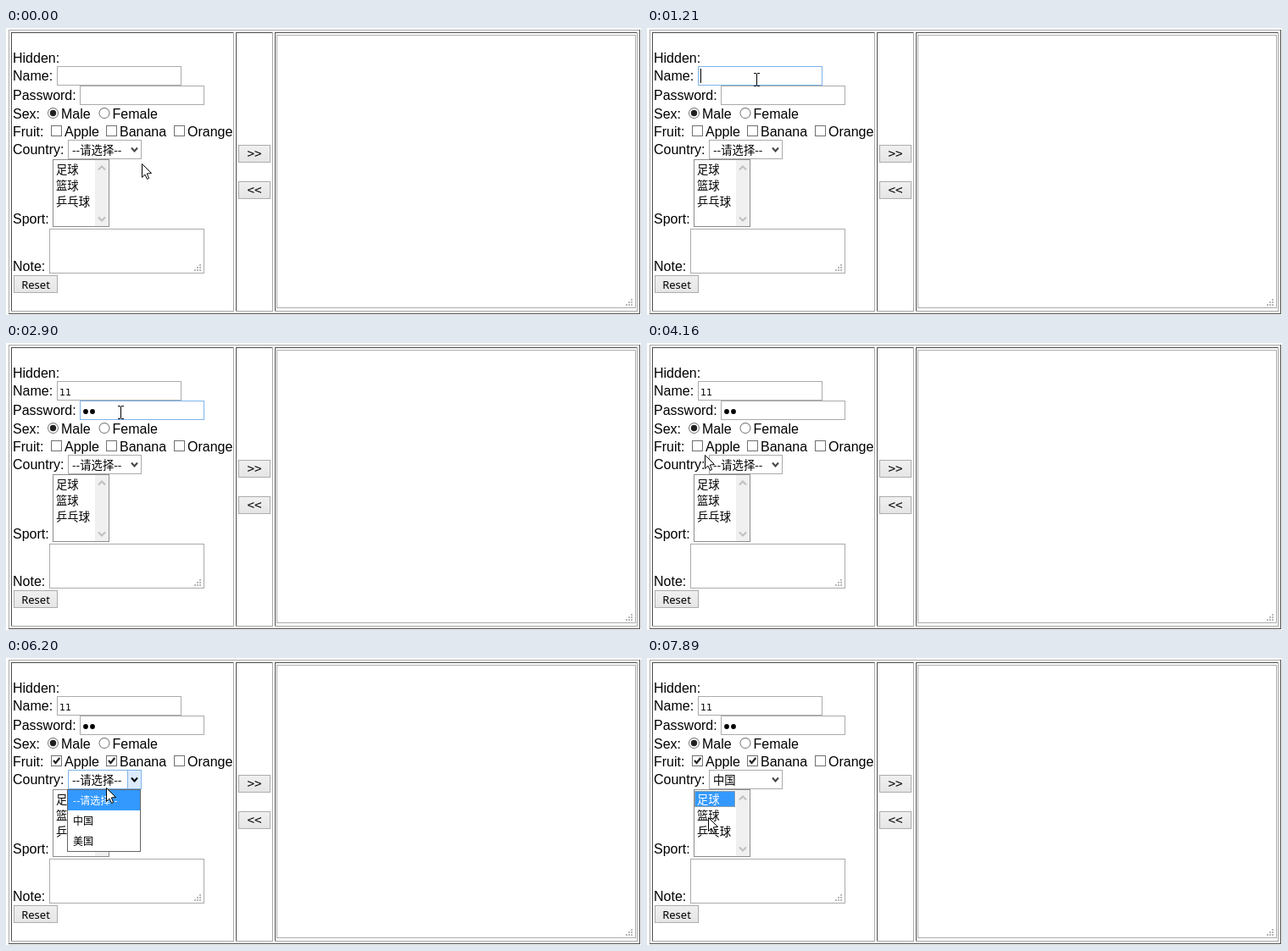
Recreate the animation shown at these times as an HTML page with a canvas. Size 749 by 339 pixels, loop 8 s.

```html
<!DOCTYPE html>
<html lang="en">
<head>
<meta charset="utf-8">
<title>Form demo</title>
<style>
  html, body { margin: 0; width: 100%; height: 100%; overflow: hidden; background: #fff; }
  canvas { display: block; }
</style>
</head>
<body>
<canvas id="stage" width="749" height="339"></canvas>
<script>
const ctx = document.getElementById('stage').getContext('2d', { alpha: false });
const LOOP = 8000, TICK = 126.5, TICK_OFFSET = 60;
const LABEL = '16px "Liberation Sans", Arial, sans-serif';
const BUTTON = '13px "Noto Sans", sans-serif';
const TYPED = '11px "DejaVu Sans", sans-serif';
const cjk = size => `${size}px "Noto Sans CJK SC", "Noto Sans CJK JP", "Noto Sans CJK", sans-serif`;
const GRAY = '#ababab', BLUE = '#7eb4ea', SELECT = '#3399ff', INK = '#212121';
const DARK_EDGE = '#4d4d4d', LIGHT_EDGE = '#a8a8a8';
const COUNTRIES = ['--请选择--', '中国', '美国'];
const SPORTS = ['足球', '篮球', '乒乓球'];

const NAME = { x: 60, y: 45, focus: 7, click: 10, keys: [14, 16], blur: 17 };
const PASSWORD = { x: 87, y: 68, focus: 17, click: 17, keys: [20, 23], blur: 31 };
const APPLE_CLICK = 37, BANANA_CLICK = 44, LIST_OPEN = 48, COUNTRY_CLICK = 56, SPORT_CLICK = 59;

// Places where the pointer turns or rests.
const visits = [
  { arrive: 0, x: 160, y: 160 },
  { arrive: 3, x: 270, y: 104 },
  { arrive: 8, leave: 21, x: 129, y: 61 },
  { arrive: 23, leave: 29, x: 135, y: 82 },
  { arrive: 33, x: 68, y: 132 },
  { arrive: 36, leave: APPLE_CLICK, x: 60, y: 122 },
  { arrive: 40, x: 155, y: 132 },
  { arrive: 41, x: 143, y: 126 },
  { arrive: 43, leave: BANANA_CLICK, x: 127, y: 127 },
  { arrive: 49, x: 118, y: 153 },
  { arrive: 55, leave: COUNTRY_CLICK, x: 110, y: 190 },
  { arrive: SPORT_CLICK, leave: 60, x: 72, y: 173 },
  { arrive: 62, x: 72, y: 188 }
];

function pointerAt(tick) {
  const i = visits.findLastIndex(visit => visit.arrive <= tick);
  const from = visits[i], to = visits[i + 1] || from;
  const start = from.leave ?? from.arrive;
  const part = tick > start && to !== from ? (tick - start) / (to.arrive - start) : 0;
  const mix = axis => Math.round(from[axis] + (to[axis] - from[axis]) * part);
  return { x: mix('x'), y: mix('y'), shown: tick < 12 || tick > 21 };
}

function rect(x, y, w, h, color) {
  ctx.fillStyle = color;
  ctx.fillRect(x, y, w, h);
}

function box(x, y, w, h, border, fill = '#fff') {
  rect(x, y, w, h, border);
  rect(x + 1, y + 1, w - 2, h - 2, fill);
}

function bevel(x, y, w, h, topLeft, bottomRight) {
  box(x, y, w, h, bottomRight);
  rect(x, y, w - 1, 1, topLeft);
  rect(x, y, 1, h - 1, topLeft);
}

function cell(left, right) {
  bevel(left, 5, right - left, 330, DARK_EDGE, LIGHT_EDGE);
}

function text(string, x, y, font = LABEL, color = '#000', align = 'left') {
  ctx.font = font;
  ctx.fillStyle = color;
  ctx.textAlign = align;
  ctx.fillText(string, x, y);
}

function line(points, color, width) {
  ctx.beginPath();
  points.forEach(([x, y]) => ctx.lineTo(x, y));
  ctx.strokeStyle = color;
  ctx.lineWidth = width;
  ctx.stroke();
}

function chevron(x, y, half, depth, color) {
  line([[x - half, y], [x, y + depth], [x + half, y]], color, 2);
}

function disc(x, y, r, color) {
  ctx.beginPath();
  ctx.arc(x, y, r, 0, Math.PI * 2);
  ctx.fillStyle = color;
  ctx.fill();
}

function button(x, y, w, label, font) {
  const shade = ctx.createLinearGradient(0, y, 0, y + 21);
  shade.addColorStop(0, '#f0f0f0');
  shade.addColorStop(1, '#e5e5e5');
  box(x, y, w, 21, '#acacac', shade);
  text(label, x + w / 2, y + 16, font, '#000', 'center');
}

function textarea(x, y, w, h) {
  box(x, y, w, h, GRAY);
  for (let row = 0; row < 3; row++)
    for (let col = 0; col <= row; col++)
      rect(x + w - 6 - col * 3, y + h - 11 + row * 3, 2, 2, '#b8b8b8');
}

function radio(x, label, on) {
  disc(x, 100.5, 6.5, '#707070');
  disc(x, 100.5, 5.5, '#fff');
  if (on) disc(x, 100.5, 3.7, INK);
  text(label, x + 9.5, 107);
}

function checkbox(x, label, on, hot) {
  box(x, 115, 13, 13, hot ? SELECT : '#707070', hot ? '#f3f9ff' : '#fff');
  if (on) line([[x + 3, 121], [x + 5.5, 124], [x + 10.3, 118]], INK, 2.2);
  text(label, x + 16, 128);
}

function field({ x, y, focus, click, keys, blur }, tick, hot, masked) {
  const focused = tick >= focus && tick < blur;
  const count = keys.filter(key => key <= tick).length;
  box(x, y, 147, 23, focused || hot ? BLUE : GRAY);
  for (let i = 0; i < count; i++) {
    if (masked) disc(x + 7 + i * 8, y + 13, 2.9, '#000');
    else text('1', x + 3 + i * 7, y + 17, TYPED);
  }
  const blinkOn = (tick - NAME.click) % 8.5 < 4;
  if (focused && tick >= click && blinkOn)
    rect(x + 3 + count * (masked ? 8 : 7), y + 3, 1, 17, '#000');
}

function ibeam(x, y) {
  rect(x, y - 7, 1, 14, '#000');
  for (const row of [y - 8, y + 7]) {
    rect(x - 3, row, 3, 1, '#000');
    rect(x + 1, row, 3, 1, '#000');
  }
}

function arrow(x, y) {
  ctx.save();
  ctx.translate(x, y);
  const shape = new Path2D('M.5 .5V16.5L4 13.2 6.5 18.5 8.6 17.5 6.3 12 11.5 11.5Z');
  ctx.fillStyle = '#fff';
  ctx.fill(shape);
  ctx.strokeStyle = '#000';
  ctx.lineWidth = 1;
  ctx.stroke(shape);
  ctx.restore();
}

function drawTable() {
  rect(0, 0, 749, 339, '#fff');
  bevel(3, 2, 745, 336, LIGHT_EDGE, DARK_EDGE);
  cell(6, 269);
  cell(271, 315);
  cell(317, 745);
  textarea(319, 8, 424, 323);
  button(274, 138, 38, '>>', cjk(15.5));
  button(274, 181, 38, '<<', cjk(15.5));
}

function drawSportList(picked) {
  box(55, 155, 67, 80, '#8c8c8c');
  rect(105, 156, 16, 78, '#f0f0f0');
  chevron(113, 167.5, 4, -4, '#bfbfbf');
  chevron(113, 223.5, 4, 4, '#bfbfbf');
  if (picked) {
    rect(56, 157, 48, 19, SELECT);
    ctx.setLineDash([1, 1]);
    ctx.strokeStyle = '#d8a060';
    ctx.lineWidth = 1;
    ctx.strokeRect(56.5, 157.5, 47, 18);
    ctx.setLineDash([]);
  }
  SPORTS.forEach((name, i) =>
    text(name, 59, 172 + i * 19, cjk(13.33), picked && i === 0 ? '#fff' : '#000'));
}

function drawCountryMenu(active) {
  box(72, 155, 87, 74, '#646464');
  rect(73, 156 + active * 24, 85, 24, SELECT);
  COUNTRIES.forEach((name, i) =>
    text(name, 79, 173 + i * 24, cjk(12), i === active ? '#fff' : '#000'));
}

function draw(tick) {
  const pointer = pointerAt(tick);
  const over = (x, y, w, h) => pointer.shown &&
    pointer.x >= x && pointer.x < x + w && pointer.y >= y && pointer.y < y + h;
  const overName = over(NAME.x, NAME.y, 147, 23);
  const overPassword = over(PASSWORD.x, PASSWORD.y, 147, 23);
  const open = tick >= LIST_OPEN && tick < COUNTRY_CLICK;

  drawTable();

  text('Hidden:', 8, 41);
  text('Name:', 8, 62);
  field(NAME, tick, overName, false);
  text('Password:', 8, 85);
  field(PASSWORD, tick, overPassword, true);

  text('Sex:', 8, 107);
  radio(55.5, 'Male', true);
  radio(116, 'Female', false);
  text('Fruit:', 8, 128);
  checkbox(53, 'Apple', tick >= APPLE_CLICK, over(53, 115, 13, 13));
  checkbox(118, 'Banana', tick >= BANANA_CLICK, over(118, 115, 13, 13));
  checkbox(198, 'Orange', false, false);

  const hot = open || over(73, 132, 87, 23);
  text('Country:', 8, 149);
  box(73, 132, 87, 23, hot ? BLUE : GRAY);
  if (hot) box(143, 132, 17, 23, BLUE, '#dcecfc');
  chevron(151.5, 141.5, 3.5, 4, hot ? '#000' : '#444');
  text(COUNTRIES[tick < COUNTRY_CLICK ? 0 : 1], 78, 149, cjk(13.33));

  text('Sport:', 8, 231);
  drawSportList(tick >= SPORT_CLICK);
  text('Note:', 8, 287);
  textarea(51, 237, 183, 53);
  button(9, 292, 52, 'Reset', BUTTON);
  if (open) drawCountryMenu(pointer.y >= 180 ? 1 : 0);

  const overText = overName || overPassword || over(134, 116, 54, 12);
  if (pointer.shown) (overText ? ibeam : arrow)(pointer.x, pointer.y);
}

function frame(now) {
  draw(Math.floor((now % LOOP + TICK_OFFSET) / TICK));
  requestAnimationFrame(frame);
}
requestAnimationFrame(frame);
</script>
</body>
</html>
```
